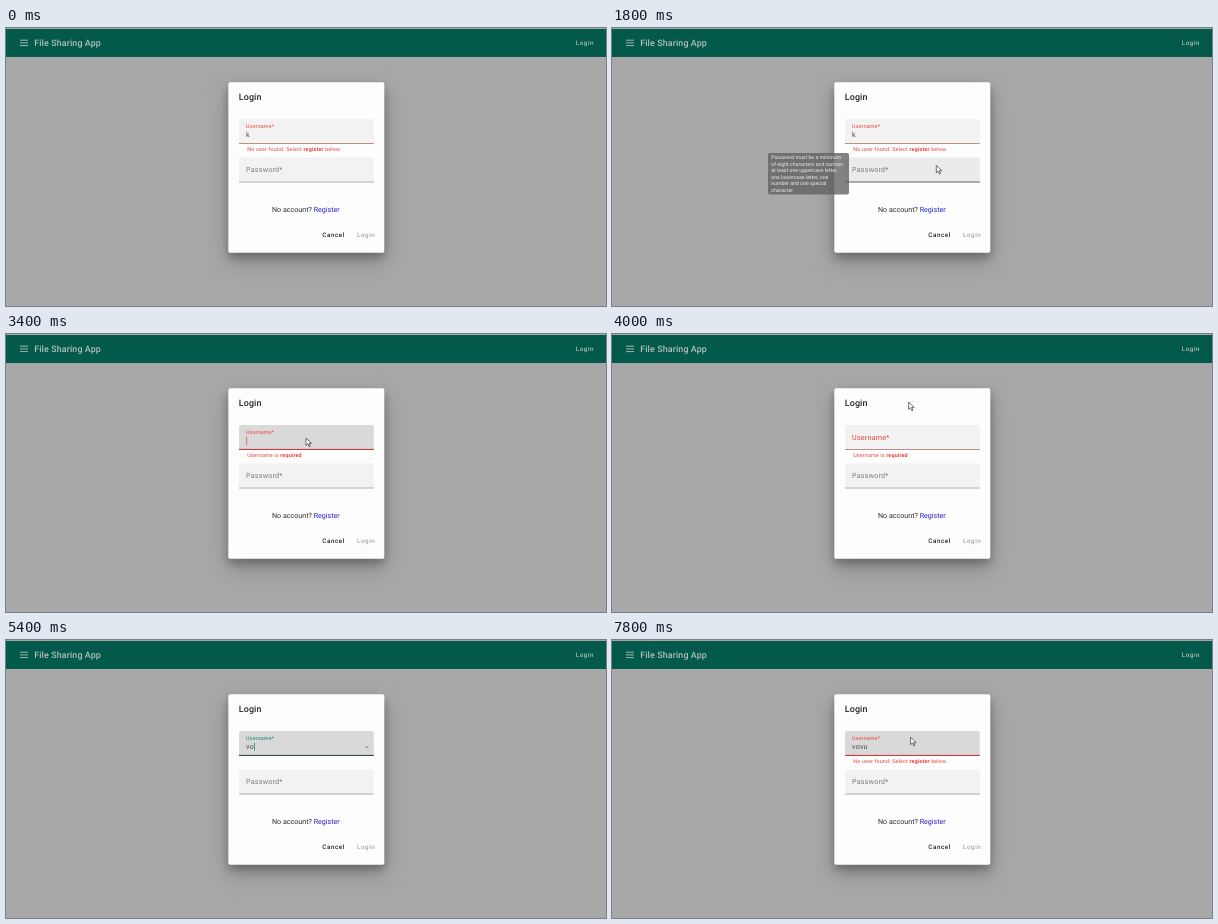
Write an HTML page that moves like this. It is 600 by 278 pixels and loops after 8000 ms.

```html
<!DOCTYPE html>
<html lang="en">
<head>
<meta charset="utf-8">
<title>Login dialog</title>
<style>
html, body { margin: 0; height: 100%; overflow: hidden; background: #a9a8a9; }
svg { display: block; width: 600px; height: 278px; }
text { font: 7.13px Roboto, sans-serif; text-rendering: geometricPrecision; white-space: pre; }
.title { font-size: 8.92px; font-weight: 500; letter-spacing: .0125em; }
.button { font-size: 6.25px; font-weight: 500; letter-spacing: .0892em; }
.field { letter-spacing: .03125em; }
.error { font-size: 5.35px; letter-spacing: .0333em; fill: #e5423b; }
.error tspan { font-weight: 700; }
.tip { font-size: 5.2px; fill: #ececec; }
.dialog { filter: drop-shadow(0 5px 5px #0004) drop-shadow(0 8px 11px #0003); }
</style>
</head>
<body>
<svg viewBox="0 0 600 278">
  <rect width="600" height="278" fill="#a9a8a9"/>
  <rect y="1" width="600" height="28" fill="#03594a"/>
  <path d="M14 12.2h8M14 14.9h8M14 17.6h8" stroke="#b1c0bb" stroke-width=".9"/>
  <g fill="#b1c0bb">
    <text class="title" x="28.2" y="18">File Sharing App</text>
    <text class="button" x="569.8" y="16.8">Login</text>
  </g>

  <rect class="dialog" x="222.3" y="54.3" width="156" height="170.4" rx="1.8" fill="#fefdfe"/>
  <text class="title" x="232.8" y="72.2" fill="#252525">Login</text>

  <path id="userBox" d="M233 115.8V92.8q0-1.8 1.8-1.8h131.2q1.8 0 1.8 1.8v23z"/>
  <path id="userLine" d="M233 115.5h134.8"/>
  <path id="ripple" stroke-width=".9"/>
  <text id="label" class="field" x="240.1">Username*</text>
  <text id="value" class="field" x="240.1" y="109.2" fill="#4b4a4b"></text>
  <path id="caret" stroke-width=".7"/>
  <path id="spinner" d="M359.6 105.5a1.5 1.5 0 0 1 2.8 0" fill="none" stroke="#666" stroke-width=".8"/>
  <text id="missing" class="error" x="241.2" y="123">No user found. Select <tspan>register</tspan> below.</text>
  <text id="required" class="error" x="241.2" y="123">Username is <tspan>required</tspan></text>

  <path id="passBox" d="M233 154.4V131.2q0-1.8 1.8-1.8h131.2q1.8 0 1.8 1.8v23.2z"/>
  <path id="passLine" d="M233 154h134.8"/>
  <text class="field" x="240.1" y="144.2" fill="#7c7b7c">Password*</text>

  <text x="266" y="184" fill="#2b2b2b">No account? <tspan fill="#2420d0">Register</tspan></text>
  <text class="button" x="316.3" y="208.6" fill="#222">Cancel</text>
  <text class="button" x="351" y="208.6" fill="#a5a5a5">Login</text>

  <g id="tooltip">
    <rect x="156" y="125" width="81" height="41.4" rx="1.8" fill="#616161" opacity=".78"/>
  </g>
  <path id="pointer" d="M0 0v7.4l1.8-1.6 1.3 2.9 1.2-.5-1.3-2.8h2.5z" fill="#fff" stroke="#333" stroke-width=".7"/>
</svg>
<script>
const LOOP = 8000, STEP = 200;
const RED = '#e5423b', TEAL = '#14826f';
const IDLE = '#f3f2f3', HOVER = '#e5e5e5', FOCUS = '#d9d9da';
const $ = id => document.getElementById(id);
const set = (id, attrs) => {
  for (const key in attrs) $(id).setAttribute(key, attrs[key]);
};
const show = (id, on) => set(id, { visibility: on ? 'visible' : 'hidden' });

const tipLines = [
  'Password must be a minimum', 'of eight characters and contain',
  'at least one uppercase letter,', 'one lowercase letter, one',
  'number and one special', 'character'
];
tipLines.forEach((line, i) => {
  const text = document.createElementNS('http://www.w3.org/2000/svg', 'text');
  text.textContent = line;
  text.setAttribute('class', 'tip');
  text.setAttribute('x', 159.2);
  text.setAttribute('y', 131.3 + i * 6.5);
  $('tooltip').append(text);
});

// Each entry changes part of the state from its time onward.
const start = {
  name: 'k', error: 'missing', box: IDLE, float: 1, ripple: 0,
  caret: false, busy: false, tip: false, pointer: null
};
const script = [
  [1800, { tip: true, pointer: [324.3, 137.3] }],
  [2000, { tip: false, pointer: [319, 122] }],
  [2200, { pointer: [311, 105], box: HOVER }],
  [2400, { pointer: null, box: FOCUS, caret: true, ripple: 361 }],
  [2600, { ripple: 367.8 }],
  [3000, { name: '', error: 'required' }],
  [3400, { pointer: [300, 104] }],
  [3600, { pointer: [298, 86] }],
  [3800, { pointer: [297, 72], box: IDLE, caret: false, ripple: 0, float: .4 }],
  [4000, { pointer: [296.7, 68], float: 0 }],
  [4200, { pointer: [294, 82] }],
  [4400, { pointer: [290, 101], box: HOVER }],
  [4600, { pointer: null, box: FOCUS, caret: true, ripple: 349, float: 1 }],
  [4800, { ripple: 367.8 }],
  [5200, { name: 'v', error: '', busy: true }],
  [5400, { name: 'vo' }],
  [5600, { name: 'vov' }],
  [5800, { name: 'vovu' }],
  [6200, { caret: false }],
  [6800, { error: 'missing', busy: false }],
  [7200, { pointer: [334, 102] }],
  [7800, { pointer: [298.6, 97.2] }]
];

function draw(t) {
  const s = { ...start };
  for (const [time, change] of script) if (t >= time) Object.assign(s, change);

  const accent = s.error ? RED : TEAL;
  set('userBox', { fill: s.box });
  set('userLine', { stroke: s.error ? '#a8625e' : '#4f5556', 'stroke-width': .7 });
  set('ripple', { d: `M233 115.4H${s.ripple}`, stroke: s.error ? '#b8332f' : '#24403d' });
  show('ripple', s.ripple);
  set('label', { y: 105.8 - 6.3 * s.float, fill: accent });
  $('label').style.fontSize = 7.13 - 1.78 * s.float + 'px';

  $('value').textContent = s.name;
  const end = 240.6 + (s.name ? $('value').getComputedTextLength() : 0);
  set('caret', { d: `M${end} 102.8v8`, stroke: accent });
  show('caret', s.caret);
  show('missing', s.error === 'missing');
  show('required', s.error === 'required');

  set('spinner', { transform: `rotate(${(t - 6600) * .45} 361 106)` });
  show('spinner', s.busy);
  set('passBox', { fill: s.tip ? '#ebebeb' : IDLE });
  set('passLine', { stroke: s.tip ? '#555' : '#929192', 'stroke-width': s.tip ? .9 : .7 });
  show('tooltip', s.tip);
  show('pointer', s.pointer);
  if (s.pointer) set('pointer', { transform: `translate(${s.pointer})` });
}

function tick() {
  const t = performance.now() % LOOP;
  draw(Math.floor(t / STEP) * STEP);
  requestAnimationFrame(tick);
}
tick();
</script>
</body>
</html>
```
